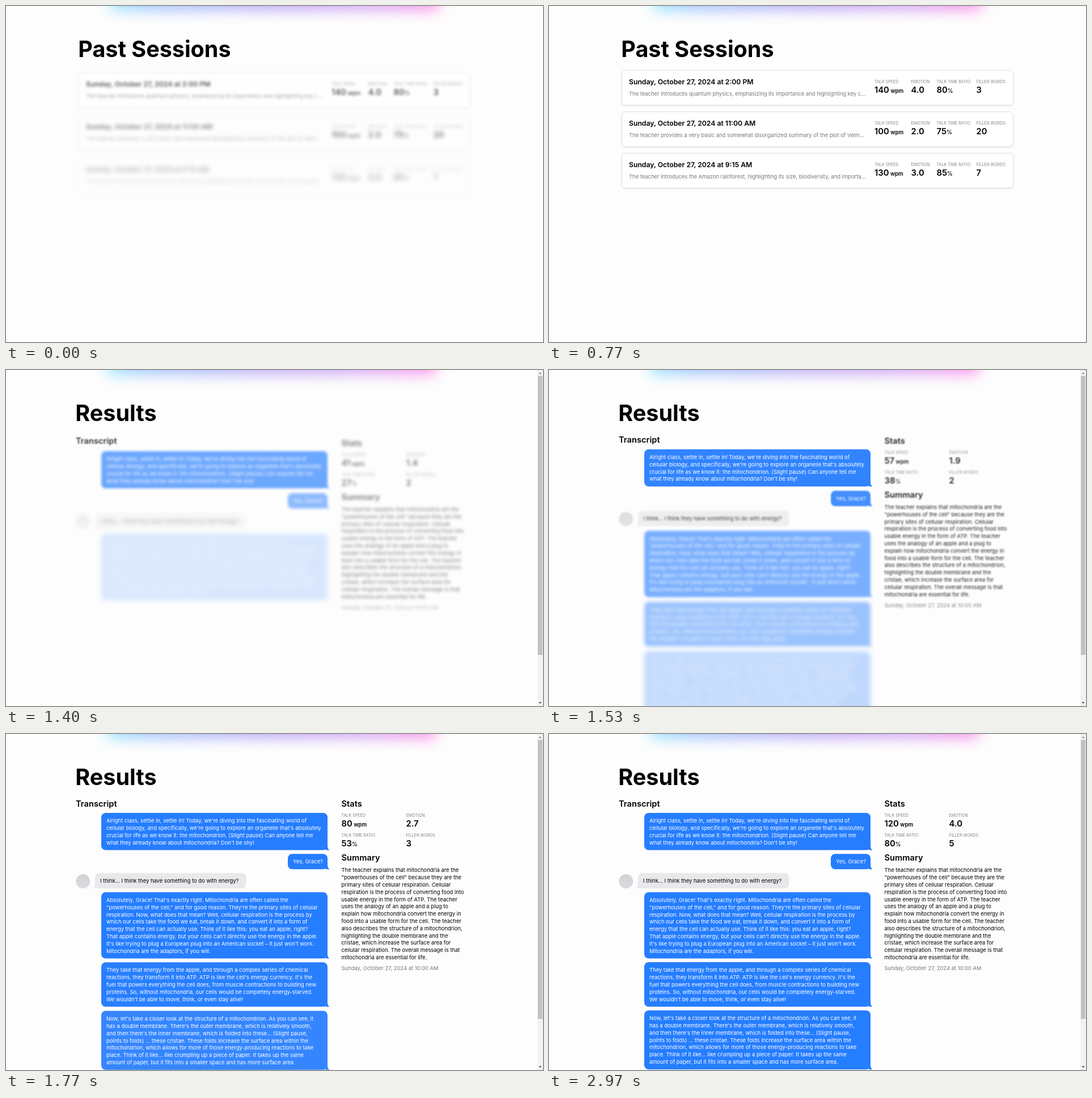
An HTML page for the animation above (3.7 s loop, 947 px wide and 592 px high).

```html
<!DOCTYPE html>
<html lang="en">
<head>
<meta charset="utf-8">
<title>Sessions and results</title>
<style>
  html, body { margin: 0; width: 100%; height: 100%; overflow: hidden; background: #fdfdfd; }
  svg { display: block; width: 947px; height: 592px; }
  text { font-family: Inter, "Open Sans", Arial, sans-serif; font-optical-sizing: none; white-space: pre; }
  .title { font-size: 39.5px; font-weight: 700; }
  .sub { font-size: 14.7px; font-weight: 600; }
  .date { font-size: 12.2px; font-weight: 600; }
  .body { font-size: 9.42px; }
  .label { font-size: 7.1px; fill: #858585; }
  .value { font-size: 14.8px; font-weight: 600; }
  .unit { font-size: 9.7px; font-weight: 600; }
  .muted { fill: #77777b; }
  .white { fill: #fff; }
  .card { fill: #fff; stroke: #e2e3e8; filter: drop-shadow(0 1px 1.5px rgba(0, 0, 0, .1)); }
</style>
</head>
<body>
<svg viewBox="0 0 947 592">
  <defs>
    <linearGradient id="rainbow">
      <stop offset="0" stop-color="#8ee6ff"/>
      <stop offset=".14" stop-color="#98beff"/>
      <stop offset=".5" stop-color="#baa4f6"/>
      <stop offset=".78" stop-color="#d2a0f6"/>
      <stop offset="1" stop-color="#ff8ae8"/>
    </linearGradient>
    <linearGradient id="avatar" x2="0" y2="1">
      <stop offset="0" stop-color="#d2d2d6"/>
      <stop offset="1" stop-color="#dcdce0"/>
    </linearGradient>
  </defs>
  <rect width="947" height="592" fill="#fdfdfd"/>
  <g id="glow">
    <rect x="185" y="-45" width="577" height="51" fill="url(#rainbow)" style="filter: blur(13px)"/>
  </g>
  <g id="past"></g>
  <g id="results"></g>
</svg>
<script>
const LOOP = 3700, CUT = 1000, MOUNT = 1119;
const BLUE = '#257dff', GREY = '#e9e9ec';
const LINE = 12.8, GAP = 6.55;
const $ = id => document.getElementById(id);
const glow = $('glow'), past = $('past'), results = $('results');

function add(parent, tag, attrs = {}, content = '') {
  const el = document.createElementNS('http://www.w3.org/2000/svg', tag);
  for (const key in attrs) el.setAttribute(key, attrs[key]);
  el.textContent = content;
  return parent.appendChild(el);
}

const text = (parent, x, y, cls, content) => add(parent, 'text', { x, y, class: cls }, content);

const paragraph = (parent, x, y, cls, lines) =>
  lines.forEach((line, i) => text(parent, x, y + i * LINE, cls, line));

// Labelled figure; returns a setter for its number.
function stat(parent, x, y, label, unit) {
  text(parent, x, y, 'label', label);
  const value = text(parent, x, y + 17, 'value', '');
  const number = add(value, 'tspan');
  if (unit) add(value, 'tspan', { class: 'unit', dx: unit === 'wpm' ? 2.5 : 0 }, unit);
  return n => { number.textContent = n; };
}

// Items that fade in, each with its start time.
const fades = [];
function fadeGroup(parent, start) {
  const el = add(parent, 'g');
  fades.push({ el, start });
  return el;
}

// Past sessions
text(past, 127.3, 89.5, 'title', 'Past Sessions');
[
  ['2:00 PM', 'The teacher introduces quantum physics, emphasizing its importance and highlighting key c…', '140', '4.0', '80', '3'],
  ['11:00 AM', 'The teacher provides a very basic and somewhat disorganized summary of the plot of Velm…', '100', '2.0', '75', '20'],
  ['9:15 AM', 'The teacher introduces the Amazon rainforest, highlighting its size, biodiversity, and importa…', '130', '3.0', '85', '7']
].forEach(([time, summary, speed, emotion, ratio, fillers], i) => {
  const card = fadeGroup(past, -184 + i * 50), y = 113.5 + i * 73;
  add(card, 'rect', { x: 128.5, y, width: 690, height: 61, rx: 6, class: 'card' });
  text(card, 141, y + 24.5, 'date', 'Sunday, October 27, 2024 at ' + time);
  text(card, 141, y + 44.4, 'body muted', summary);
  stat(card, 574, y + 22.6, 'TALK SPEED', 'wpm')(speed);
  stat(card, 638.5, y + 22.6, 'EMOTION')(emotion);
  stat(card, 683.5, y + 22.6, 'TALK TIME RATIO', '%')(ratio);
  stat(card, 753.5, y + 22.6, 'FILLER WORDS')(fillers);
});

// Results: transcript
const itemStart = i => MOUNT + 39 + i * 50;
text(results, 122.3, 89.5, 'title', 'Results');
text(fadeGroup(results, itemStart(0)), 123, 128, 'sub', 'Transcript');

const messages = [
  { x: 168, w: 399, lines: [
    "Alright class, settle in, settle in! Today, we're diving into the fascinating world of",
    "cellular biology, and specifically, we're going to explore an organelle that's absolutely",
    'crucial for life as we know it: the mitochondrion. (Slight pause) Can anyone tell me',
    "what they already know about mitochondria? Don't be shy!"] },
  { x: 497, w: 70, lines: ['Yes, Grace?'] },
  { x: 157, w: 266.5, student: true, lines: ['I think… I think they have something to do with energy?'] },
  { x: 168, w: 399, lines: [
    "Absolutely, Grace! That's exactly right. Mitochondria are often called the",
    "\"powerhouses of the cell,\" and for good reason. They're the primary sites of cellular",
    'respiration. Now, what does that mean? Well, cellular respiration is the process by',
    'which our cells take the food we eat, break it down, and convert it into a form of',
    'energy that the cell can actually use. Think of it like this: you eat an apple, right?',
    "That apple contains energy, but your cells can't directly use the energy in the apple.",
    "It's like trying to plug a European plug into an American socket – it just won't work.",
    'Mitochondria are the adaptors, if you will.'] },
  { x: 168, w: 399, lines: [
    'They take that energy from the apple, and through a complex series of chemical',
    "reactions, they transform it into ATP. ATP is like the cell's energy currency. It's the",
    'fuel that powers everything the cell does, from muscle contractions to building new',
    'proteins. So, without mitochondria, our cells would be completely energy-starved.',
    "We wouldn't be able to move, think, or even stay alive!"] },
  { x: 168, w: 399, lines: [
    "Now, let's take a closer look at the structure of a mitochondrion. As you can see, it",
    "has a double membrane. There's the outer membrane, which is relatively smooth,",
    "and then there's the inner membrane, which is folded into these… (Slight pause,",
    'points to folds) … these cristae. These folds increase the surface area within the',
    'mitochondrion, which allows for more of those energy-producing reactions to take',
    'place. Think of it like… like crumpling up a piece of paper. It takes up the same',
    'amount of paper, but it fits into a smaller space and has more surface area.'] }
];

let bubbleTop = 139;
messages.forEach(({ x, w, student, lines }, i) => {
  const g = fadeGroup(results, itemStart(i + 1));
  const h = lines.length * LINE + 14.4, bottom = bubbleTop + h;
  const fill = student ? GREY : BLUE;
  const edge = student ? x : x + w, dir = student ? -1 : 1;
  if (student) add(g, 'circle', { cx: 135.8, cy: bubbleTop + 14.7, r: 12.5, fill: 'url(#avatar)' });
  add(g, 'rect', { x, y: bubbleTop, width: w, height: h, rx: 7.7, fill });
  add(g, 'path', {
    d: `M${edge} ${bottom - 8}Q${edge} ${bottom - 2} ${edge + 3.5 * dir} ${bottom}` +
       `Q${edge - 3 * dir} ${bottom + .8} ${edge - 7 * dir} ${bottom - 3}Z`,
    fill
  });
  paragraph(g, x + 9, bubbleTop + 17.3, student ? 'body' : 'body white', lines);
  bubbleTop = bottom + GAP;
});

// Results: side column
const side = fadeGroup(results, itemStart(2));
text(side, 591.5, 128, 'sub', 'Stats');
const counters = [
  [stat(side, 591.5, 146.2, 'TALK SPEED', 'wpm'), 120, 0],
  [stat(side, 705.5, 146.2, 'EMOTION'), 4, 1],
  [stat(side, 591.5, 180.8, 'TALK TIME RATIO', '%'), 80, 0],
  [stat(side, 705.5, 180.8, 'FILLER WORDS'), 5, 0]
];
text(side, 591.5, 223, 'sub', 'Summary');
paragraph(side, 591.5, 243.3, 'body', [
  'The teacher explains that mitochondria are the',
  '"powerhouses of the cell" because they are the',
  'primary sites of cellular respiration. Cellular',
  'respiration is the process of converting food into',
  'usable energy in the form of ATP. The teacher',
  'uses the analogy of an apple and a plug to',
  'explain how mitochondria convert the energy in',
  'food into a usable form for the cell. The teacher',
  'also describes the structure of a mitochondrion,',
  'highlighting the double membrane and the',
  'cristae, which increase the surface area for',
  'cellular respiration. The overall message is that',
  'mitochondria are essential for life.'
]);
text(side, 591.5, 416.4, 'body muted', 'Sunday, October 27, 2024 at 10:00 AM');

// Round arrow button
const button = add(results, 'g', { transform: 'translate(869 296)' });
const halo = add(button, 'circle', { r: 26, fill: '#b8d3f6' });
add(button, 'circle', { r: 12.5, fill: '#1f78ec', style: 'filter: drop-shadow(0 1px 1.5px rgba(0,0,0,.35))' });
add(button, 'path', {
  d: 'M-4.7 0H4.7M.3 -4.5L4.8 0L.3 4.5',
  fill: 'none', stroke: '#fff', 'stroke-width': 1.4
});

// Scrollbar
add(results, 'rect', { x: 937, y: 0, width: 10, height: 592, fill: '#f2f2f3' });
add(results, 'rect', { x: 938, y: 10.5, width: 8, height: 491.5, fill: '#c1c1c3' });
add(results, 'path', { d: 'M939.5 7L942 4L944.5 7Z', fill: '#8a8a8a' });
add(results, 'path', { d: 'M939.5 585L942 588L944.5 585Z', fill: '#505050' });

const clamp = v => Math.min(1, Math.max(0, v));

// cubic-bezier(0, 0, .58, 1)
function easeOut(x) {
  if (x <= 0 || x >= 1) return clamp(x);
  let lo = 0, hi = 1;
  for (let i = 0; i < 24; i++) {
    const s = (lo + hi) / 2;
    if (s * s * (1.74 - .74 * s) < x) lo = s; else hi = s;
  }
  return lo * lo * (3 - 2 * lo);
}

function render(t) {
  const onResults = t >= CUT;
  past.style.display = onResults ? 'none' : '';
  results.style.display = onResults ? '' : 'none';
  glow.setAttribute('transform', `translate(${onResults ? -5 : 0} 0)`);

  for (const { el, start } of fades) {
    const p = easeOut((t - start) / 400), rest = 1 - p;
    el.style.opacity = p;
    el.style.filter = rest > 0 ? `blur(${6 * rest}px)` : 'none';
    el.setAttribute('transform', `translate(0 ${12 * rest})`);
  }

  const count = 1 - Math.pow(1 - clamp((t - MOUNT) / 1832), 2.5);
  for (const [set, goal, digits] of counters) set((goal * count).toFixed(digits));

  const gone = easeOut((t - 1190) / 200);
  button.style.opacity = 1 - gone;
  halo.setAttribute('r', 26 - 8 * gone);
}

const began = performance.now();
function tick() {
  render((performance.now() - began) % LOOP);
  requestAnimationFrame(tick);
}
tick();
</script>
</body>
</html>
```
